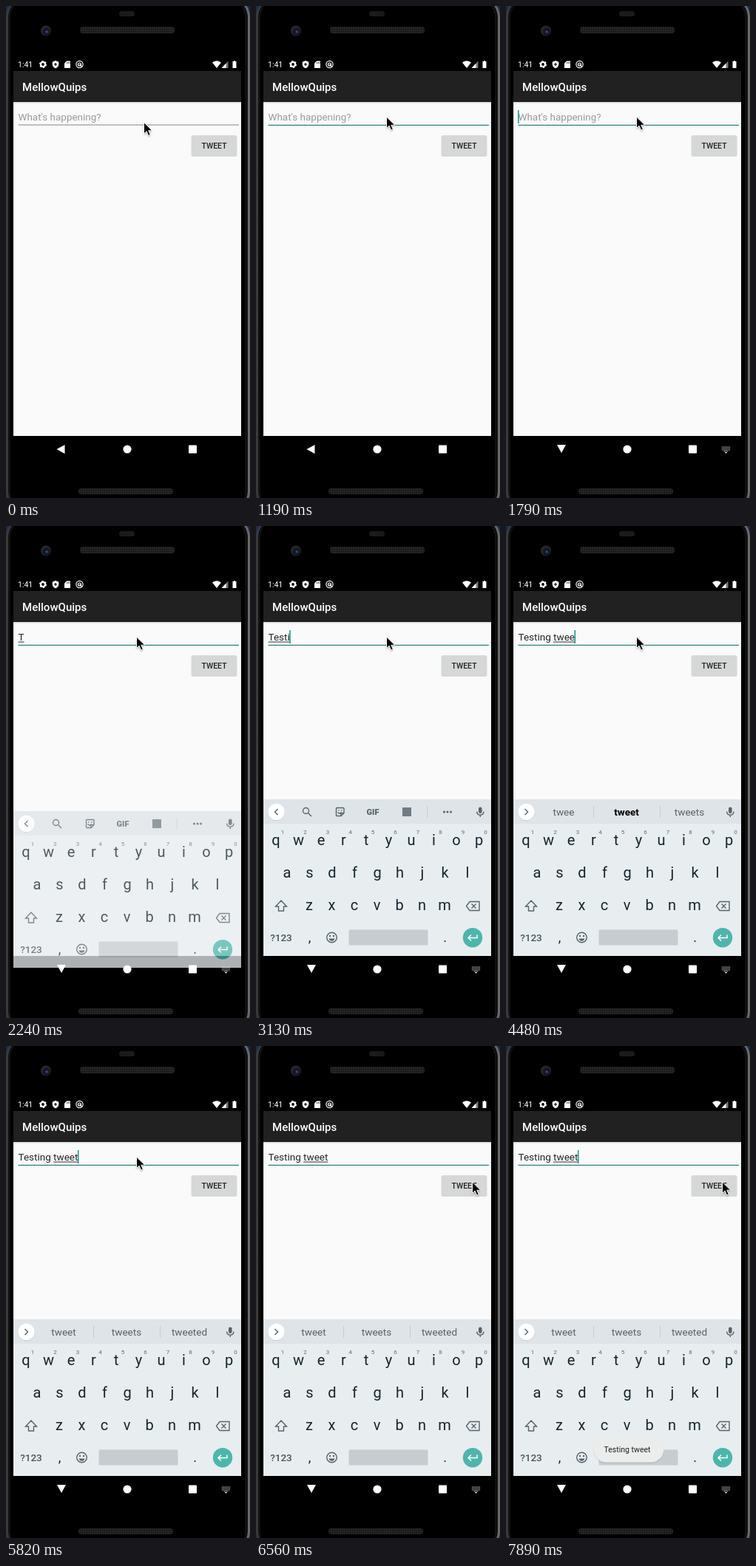
These frames come from a looping animation (330x666 px, 8 s). An HTML page:

```html
<!DOCTYPE html>
<html lang="en">
<head>
<meta charset="utf-8">
<title>Phone post composer</title>
<style>
  html, body { margin: 0; width: 100%; height: 100%; overflow: hidden; background: #000; }
  svg { display: block; width: 100%; height: 100%; font-family: Roboto, sans-serif; }
  text { white-space: pre; }
  .mid { text-anchor: middle; }
  .line { fill: none; stroke: #56646b; stroke-width: 1.4; }
</style>
</head>
<body>
<svg viewBox="0 0 330 666">
  <defs>
    <linearGradient id="shade" x2="0" y2="1">
      <stop offset="0" stop-opacity=".1"/><stop offset="1" stop-opacity="0"/>
    </linearGradient>
    <linearGradient id="rim">
      <stop offset="0" stop-color="#3a3a3a"/><stop offset=".1" stop-color="#262626"/>
      <stop offset=".85" stop-color="#333"/><stop offset="1" stop-color="#6a6a6a"/>
    </linearGradient>
    <radialGradient id="lens" cx=".58" cy=".6">
      <stop offset="0" stop-color="#6384c8"/><stop offset=".18" stop-color="#1c2a58"/>
      <stop offset=".5" stop-color="#10121c"/><stop offset="1" stop-color="#29292b"/>
    </radialGradient>
    <pattern id="mesh" width="3" height="3" patternUnits="userSpaceOnUse">
      <rect width="3" height="3" fill="#272727"/><circle cx="1.5" cy="1.5" r=".9" fill="#101010"/>
    </pattern>
    <filter id="soft" x="-50%" y="-50%" width="200%" height="200%"><feGaussianBlur stdDeviation="1"/></filter>
  </defs>

  <!-- phone body -->
  <rect width="330" height="666" fill="#142d52"/>
  <rect x="1.500" y="-14" width="327" height="700" rx="30" fill="#0d0d0d" stroke="url(#rim)" stroke-width="3"/>
  <rect x="5" y="-10" width="319" height="694" rx="26" fill="#000" stroke="#1a1a1a"/>
  <rect x="153" y="7" width="21" height="7" rx="3.500" fill="#1b1b1b"/>
  <circle cx="54" cy="33.500" r="7" fill="url(#lens)"/>
  <rect x="100" y="28" width="128" height="9" rx="4" fill="url(#mesh)"/>
  <rect x="98" y="653" width="128" height="8" rx="4" fill="url(#mesh)"/>

  <!-- status bar -->
  <g fill="#fff">
    <text x="16" y="83" font-size="10.5">1:41</text>
    <circle cx="50" cy="79" r="3" fill="none" stroke="#fff" stroke-width="2.2"/>
    <circle cx="50" cy="79" r="4.400" fill="none" stroke="#fff" stroke-width="1.300" stroke-dasharray="2.300 2.300"/>
    <path d="M67 74l4.300 1.700v3c0 2.700-1.800 4.600-4.300 5.500-2.500-.9-4.300-2.800-4.300-5.500v-3z"/>
    <path d="M65 79h4M67 77v4" stroke="#000" stroke-width="1.200"/>
    <path d="M82 74.500h5v9.500h-8v-6.500z"/>
    <path d="M82.500 76v2M84.300 76v2M86 76v2" stroke="#000" stroke-width=".7"/>
    <g fill="none" stroke="#fff" stroke-width="1.200">
      <circle cx="99.500" cy="79" r="4.600"/><circle cx="99.500" cy="79" r="2"/><path d="M99.500 79l3.500 3.500"/>
    </g>
    <path d="M279 76.500q6-4.500 12 0l-6 7.500z"/>
    <path d="M300.500 74.500v9.500h-9z" fill="#777"/><path d="M297.500 77.700v6.300h-6z"/>
    <path d="M308 74h2v1h1.500v9h-5v-9h1.500z"/>
  </g>

  <!-- app -->
  <rect x="10" y="130" width="308" height="452" fill="#fafafa"/>
  <rect x="10" y="88" width="308" height="42" fill="#212121"/>
  <rect x="10" y="130" width="308" height="3" fill="url(#shade)"/>
  <text x="22" y="115" font-size="15" font-weight="500" fill="#fff">MellowQuips</text>
  <text id="hint" x="16.500" y="155" font-size="13.450" fill="#9a9a9a">What's happening?</text>
  <text id="entry" x="16.500" y="155" font-size="13.500" fill="#262626"></text>
  <rect id="spell" y="156.500" height="1" fill="#333"/>
  <rect id="caret" y="141" width="1.500" height="18" fill="#139488"/>
  <rect id="field" x="16.500" width="298.500"/>
  <rect x="250.500" y="175.500" width="62" height="28.500" rx="2" fill="#000" opacity=".13"/>
  <rect id="button" x="251" y="175" width="61" height="28" rx="1.500"/>
  <text class="mid" x="281.500" y="193" font-size="10.500" font-weight="500" fill="#222">TWEET</text>

  <!-- keyboard -->
  <g id="keyboard">
    <rect x="10" y="370" width="308" height="212" fill="#e8edf0"/>
    <rect x="10" y="370" width="308" height="33" fill="#dfe4e8"/>
    <circle cx="27.500" cy="387.500" r="11.500" fill="#000" opacity=".1"/>
    <circle cx="27.500" cy="387" r="11.200" fill="#fff"/>
    <path id="chevron" class="line" d="M29.500 383l-4 4 4 4"/>
    <g id="tools">
      <circle class="line" cx="67.500" cy="385.500" r="4"/><path class="line" d="M70.500 388.500l4.500 4.500"/>
      <path class="line" d="M109.500 381.500h8.500q1 0 1 1v6l-4 4h-5.500q-1 0-1-1v-9q0-1 1-1zM119 388.500h-4v4M110.500 387.500q2.500 3 5 0M111 385h1.300M115 385h1.300"/>
      <text class="mid" x="158" y="391" font-size="11" font-weight="900" fill="#56646b">GIF</text>
      <rect x="198" y="381" width="12" height="12" fill="#707c82"/>
      <path d="M231.500 379v16" stroke="#c7cdd1"/>
      <g fill="#56646b"><circle cx="254.500" cy="387" r="1.500"/><circle cx="259" cy="387" r="1.500"/><circle cx="263.500" cy="387" r="1.500"/></g>
    </g>
    <g id="words" class="mid" font-size="13.500">
      <path d="M118.500 379v16M208.500 379v16" stroke="#c7cdd1"/>
      <text x="78" y="392"></text><text x="163" y="392"></text><text x="248" y="392"></text>
    </g>
    <rect x="301" y="380.500" width="4.600" height="8.500" rx="2.300" fill="#56646b"/>
    <path class="line" d="M298.700 386.500q0 4.700 4.600 4.700t4.600-4.700M303.300 391v3"/>
    <g id="keys" class="mid" fill="#14262e"></g>
    <path class="line" d="M34 507l7.500 8h-4v6h-7v-6h-4z"/>
    <path class="line" d="M289 508.500h13v12h-13l-4.500-6zM291.500 511.500l6 6M297.500 511.500l-6 6"/>
    <circle class="line" cx="102.500" cy="557" r="6.800"/>
    <path d="M98.500 558.500h8q-1.200 3.200-4 3.200t-4-3.200z" fill="#56646b"/>
    <circle cx="100" cy="555" r="1.200" fill="#56646b"/><circle cx="105" cy="555" r="1.200" fill="#56646b"/>
    <rect x="125.500" y="546.500" width="107" height="21" rx="1.500" fill="#c7ccd0"/>
    <circle cx="293" cy="557.200" r="13.200" fill="#4db6ac"/>
    <path d="M299 553.500v4h-11.500M291 553.500l-4 4 4 4" fill="none" stroke="#fff" stroke-width="1.500"/>
  </g>

  <!-- navigation bar -->
  <g fill="#fff">
    <path id="back" d="M-5.500 0L5.500-6V6z"/>
    <circle cx="164" cy="600" r="5.600"/>
    <rect x="247" y="594.500" width="11" height="11" rx=".8"/>
    <g id="switcher">
      <path d="M292 597h11M292 599h11M292 601h11" stroke="#ddd" stroke-width="1.200" stroke-dasharray="1.200 .8"/>
      <path d="M294.500 602.800h6" stroke="#ddd" stroke-width=".8"/><path d="M295.800 604h3.400l-1.700 1.800z"/>
    </g>
  </g>

  <g id="toast">
    <rect x="118" y="529" width="96" height="36" rx="18" fill="#000" opacity=".07"/>
    <rect x="118.500" y="528.500" width="95" height="35" rx="17.500" fill="#ebecec"/>
    <text class="mid" x="164" y="550" font-size="10.500" fill="#222">Testing tweet</text>
  </g>
  <g id="pointer">
    <path d="M0 1.500v15.500l3.600-3.400 2.500 5.900 2.700-1.200-2.500-5.600h5z" opacity=".4" filter="url(#soft)"/>
    <path d="M0 0v15.500l3.600-3.400 2.500 5.900 2.700-1.200-2.500-5.600h5z" stroke="#fff"/>
  </g>
</svg>
<script>
const $ = id => document.getElementById(id);
const set = (el, attrs) => { for (const k in attrs) el.setAttribute(k, attrs[k]); };
const show = (el, on) => el.setAttribute('visibility', on ? 'visible' : 'hidden');
const LOOP = 8000;

const draft = [[0, ''], [2240, 'T'], [2390, 'Te'], [2690, 'Tes'], [2980, 'Test'], [3130, 'Testi'],
  [3280, 'Testin'], [3430, 'Testing'], [3880, 'Testing '], [4030, 'Testing t'], [4180, 'Testing tw'],
  [4480, 'Testing twee'], [4930, 'Testing tweet']];
const suggestions = [[0, null], [3430, 'Testing,testing,Testings'], [3880, 'the,for,is'],
  [4030, 't,the,to'], [4180, 'tw,two,twice'], [4480, 'twee,tweet,tweets'], [4930, 'tweet,tweets,tweeted']];
const pointer = [[0, [186.5, 157.5]], [150, [182, 153]], [300, [176.5, 150]], [6120, [192, 153]],
  [6270, [238, 167]], [6420, [284, 181]], [6560, [292.5, 184]]];
const blink = [450, 1190, 1640, 2240, 2390, 5370, 5820, 6420, 6860, 7440, 7890];
const backTurn = [[0, 0], [1490, -35], [1640, -70], [1790, -90]];
const press = [[0, '#d6d7d7'], [6860, '#c5c6c6'], [7010, '#cccdcd'], [7150, '#d6d7d7']];
const toastFade = [[0, 0], [7150, .25], [7300, .6], [7440, .85], [7590, 1]];

const at = (steps, t) => steps.findLast(([start]) => start <= t)[1];

function addKey(label, x, y, size, attrs = {}) {
  const key = document.createElementNS('http://www.w3.org/2000/svg', 'text');
  set(key, { x, y, 'font-size': size, ...attrs });
  key.textContent = label;
  $('keys').append(key);
}

[['qwertyuiop', 27, 432], ['asdfghjkl', 42, 476], ['zxcvbnm', 72, 520]].forEach(([row, x, y]) =>
  [...row].forEach((letter, i) => addKey(letter, x + i * 30.5, y, 20)));
[...'1234567890'].forEach((digit, i) => addKey(digit, 36 + i * 30.5, 417, 8, { fill: '#5f6d74' }));
addKey('?123', 34, 562, 13.500, { fill: '#46555c', 'font-weight': 500 });
addKey(',', 72.500, 563, 18);
addKey('.', 255.500, 563, 18);

function measure(text) {
  $('entry').textContent = text;
  return text ? $('entry').getComputedTextLength() : 0;
}

function drawEntry(t) {
  const text = at(draft, t);
  const wordStart = text.lastIndexOf(' ') + 1;
  const from = measure(text.slice(0, wordStart));
  const end = measure(text);
  set($('spell'), { x: 16.500 + from, width: Math.max(0, end - from) });
  set($('caret'), { x: 16 + end });
  show($('caret'), blink.filter(time => time <= t).length % 2);
  show($('hint'), !text);
  const focused = t >= 300;
  set($('field'), focused ? { y: 160.750, height: 1.250, fill: '#2a8280' }
                          : { y: 160.500, height: 1, fill: '#858585' });
}

function drawKeyboard(t) {
  const settling = t < 2390;
  set($('keyboard'), { transform: `translate(0 ${settling ? 16 : 0})`, opacity: settling ? .75 : 1 });
  $('keyboard').style.display = t < 2240 ? 'none' : '';
  const list = at(suggestions, t);
  $('tools').style.display = list ? 'none' : '';
  $('words').style.display = list ? '' : 'none';
  set($('chevron'), { d: list ? 'M25.500 383l4 4-4 4' : 'M29.500 383l-4 4 4 4' });
  if (!list) return;
  const corrected = t >= 4480 && t < 4930;
  const words = list.split(',');
  $('words').querySelectorAll('text').forEach((el, i) => {
    const bold = corrected && i === 1;
    el.textContent = words[i];
    set(el, { fill: bold ? '#000' : '#566268', 'font-weight': bold ? 700 : 400 });
  });
}

function draw(t) {
  drawEntry(t);
  drawKeyboard(t);
  const turn = at(backTurn, t);
  set($('back'), { transform: `translate(${turn ? '75 599.5' : '74 600'}) rotate(${turn})` });
  show($('switcher'), t >= 1490);
  set($('button'), { fill: at(press, t) });
  set($('toast'), { opacity: at(toastFade, t) });
  set($('pointer'), { transform: `translate(${at(pointer, t)})` });
}

const begin = performance.now();
function tick() {
  draw((performance.now() - begin) % LOOP);
  requestAnimationFrame(tick);
}
tick();
</script>
</body>
</html>
```
